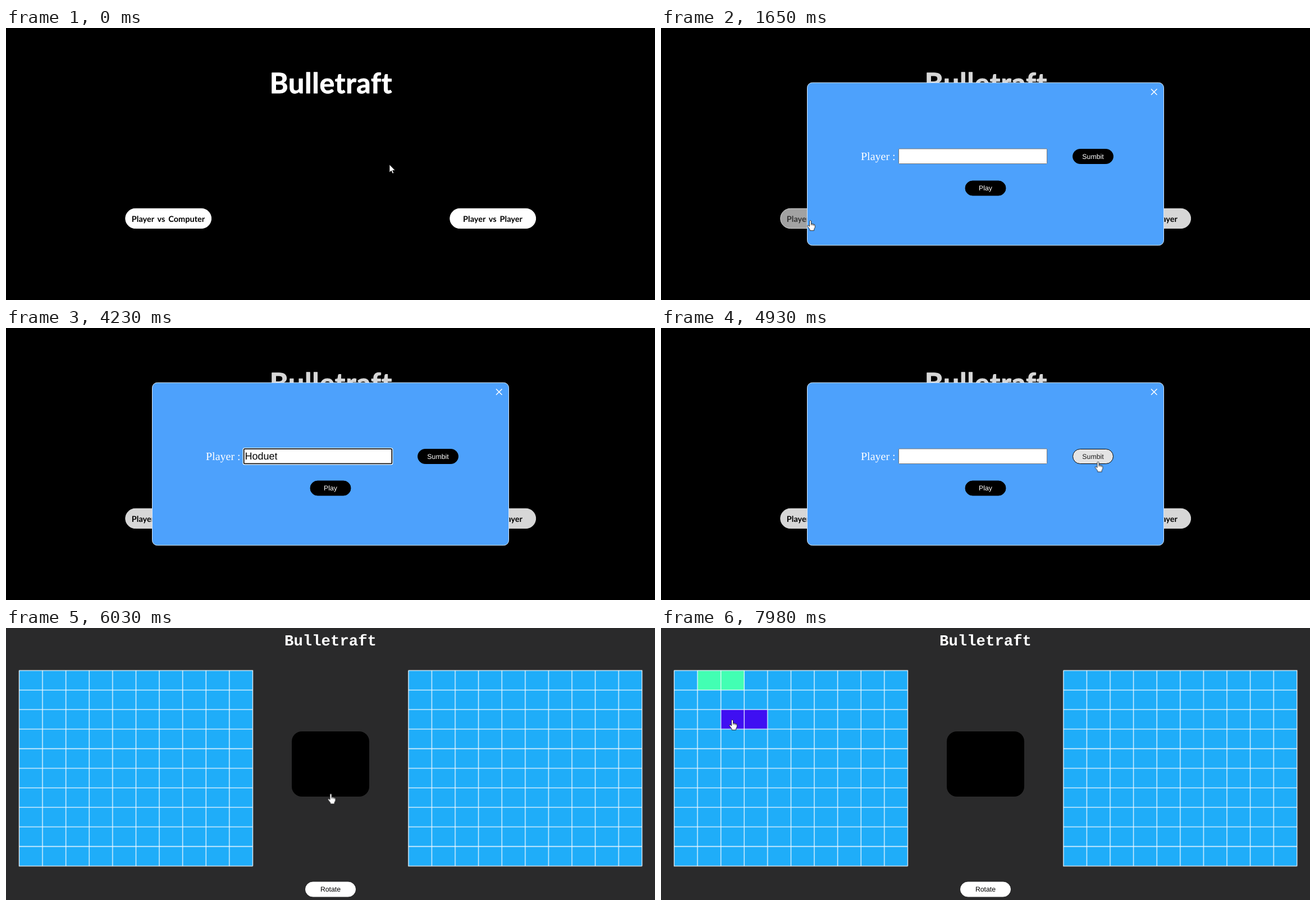
Write an HTML page that moves like this. It is 1156 px wide and 484 px high and loops after 8000 ms.

```html
<!DOCTYPE html>
<html lang="en">
<head>
<meta charset="utf-8">
<title>Bulletraft</title>
<style>
  html, body { margin: 0; height: 100%; overflow: hidden; background: #000; }
  svg { display: block; width: 100vw; height: 100vh; }
  text { text-anchor: middle; text-rendering: geometricPrecision; }

  .menu-font { font-family: Lato, sans-serif; font-weight: 700; stroke-linejoin: round; }
  .menu-title { font-size: 50px; fill: #fff; stroke: #fff; stroke-width: 1; letter-spacing: .8px; }
  .menu-label { font-size: 14.5px; word-spacing: 2.5px; }
  .ui { font: 12.3px "Liberation Sans", Arial, sans-serif; }
  .left { text-anchor: start; }
  .field-label { font: 20px "Liberation Serif", serif; fill: #fff; }
  .typed { font: 18px "Liberation Sans", Arial, sans-serif; }
  .game-title { font: bold 27.3px "Liberation Mono", monospace; fill: #fff; }

  .light { fill: #fff; color: #000; stroke: #fff; }
  .dark { fill: #000; color: #fff; stroke: #000; }
  .light text, .dark text { fill: currentColor; stroke: none; }

  /* One loop is 8 s, so 1% is 80 ms. */
  .hover { animation: 8s ease infinite; }
  .step { animation: 8s step-end infinite; }

  .versus { animation-name: versus; }
  @keyframes versus {
    0%, 7%, 25.4%, 100% { fill: #fff; color: #000; }
    15.6%, 16.6% { fill: #000; color: #fff; }
  }
  .send { animation-name: send; }
  @keyframes send {
    0%, 56.25%, 74.5%, 100% { fill: #000; color: #fff; }
    65%, 65.75% { fill: #fff; color: #000; }
  }
  .play { animation-name: play; }
  @keyframes play {
    0%, 69.25% { fill: #000; color: #fff; }
    78%, 100% { fill: #fff; color: #000; }
  }

  .dialog { animation-name: dialog; }
  @keyframes dialog { 0% { opacity: 0 } 16.62% { opacity: 1 } }
  .game { animation-name: game; }
  @keyframes game { 0% { opacity: 0 } 75.37% { opacity: 1 } }
  .focus { animation-name: focus; }
  @keyframes focus { 0% { opacity: 0 } 28.25% { opacity: 1 } 59.5% { opacity: 0 } }
  .caret { animation-name: caret; }
  @keyframes caret { 0% { opacity: 1 } 52.87% { opacity: 0 } }
  .typing { animation-name: typing; }
  @keyframes typing {
    0% { transform: translateX(0) }
    34.75% { transform: translateX(13px) }
    36.62% { transform: translateX(23px) }
    37.75% { transform: translateX(33px) }
    44.87% { transform: translateX(43px) }
    45.9% { transform: translateX(53px) }
    46.87%, 100% { transform: translateX(58px) }
  }

  /* Translations count in cells. */
  .ship { fill: #3f0ff2; animation-name: ship; }
  @keyframes ship {
    0% { opacity: 0; transform: translate(8px, 3px) }
    77.62% { opacity: 1; transform: translate(8px, 3px) }
    78.6% { opacity: 1; transform: translate(7px, 1px) }
    79.5% { opacity: 1; transform: translate(6px, 0) }
    83.62% { opacity: 1; transform: translate(3px, 0) }
    84.6% { opacity: 1; transform: translate(2px, 0) }
    85.5% { opacity: 1; transform: translate(1px, 0) }
    88.5% { opacity: 0; transform: translate(1px, 0) }
    96.75% { opacity: 1; transform: translate(2px, 1px) }
    97.75%, 100% { opacity: 1; transform: translate(2px, 2px) }
  }
  .placed { fill: #42ffb3; animation-name: placed; }
  @keyframes placed { 0% { opacity: 0 } 88.5% { opacity: 1 } }

  .pointer { animation-name: pointer; }
  @keyframes pointer {
    0% { transform: translate(683px, 243px) }
    1.62% { transform: translate(600px, 193px) }
    7.62% { transform: translate(287px, 355px) }
    8.6% { transform: translate(278px, 352px) }
    9.6% { transform: translate(270px, 346px) }
    10.6% { transform: translate(266px, 342px) }
    21.5% { transform: translate(290px, 330px) }
    22.5% { transform: translate(360px, 285px) }
    23.5% { transform: translate(430px, 246px) }
    55% { transform: translate(700px, 240px) }
    56% { transform: translate(750px, 238px) }
    57% { transform: translate(772px, 238px) }
    58% { transform: translate(778.5px, 237.5px) }
    65.75% { transform: translate(760px, 250px) }
    66.75% { transform: translate(700px, 266px) }
    67.75% { transform: translate(640px, 282px) }
    69.25% { transform: translate(600px, 290px) }
    70.2% { transform: translate(584px, 293px) }
    71.2% { transform: translate(578.5px, 294.5px) }
    77.62% { transform: translate(380px, 190px) }
    78.6% { transform: translate(330px, 130px) }
    79.5% { transform: translate(290px, 95px) }
    83.62% { transform: translate(137px, 91px) }
    84.6% { transform: translate(112px, 91px) }
    85.5% { transform: translate(94px, 91px) }
    94.75% { transform: translate(108px, 96px) }
    95.75% { transform: translate(113px, 108px) }
    96.75% { transform: translate(118px, 130px) }
    97.75% { transform: translate(123px, 148px) }
    98.75% { transform: translate(126px, 158px) }
    99.75%, 100% { transform: translate(127px, 163px) }
  }
  .arrow, .hand { fill: #fff; stroke: #111; stroke-width: .8; stroke-linejoin: round; }
  .arrow { animation-name: arrow; }
  @keyframes arrow {
    0% { opacity: 1 } 7.62% { opacity: 0 }
    21.5% { opacity: 1 } 24.5% { opacity: 0 }
    55% { opacity: 1 } 56% { opacity: 0 }
    65.75% { opacity: 1 } 69.25%, 100% { opacity: 0 }
  }
  .hand { animation-name: hand; }
  @keyframes hand {
    0% { opacity: 0 } 7.62% { opacity: 1 }
    21.5% { opacity: 0 } 56% { opacity: 1 }
    65.75% { opacity: 0 } 69.25%, 100% { opacity: 1 }
  }
</style>
</head>
<body>
<svg viewBox="0 0 1156 484" preserveAspectRatio="none">
  <defs>
    <rect id="sea" width="10" height="10" fill="#1fadf9"/>
    <path id="lines" fill="none" stroke="#f4faff" stroke-width="1.3" vector-effect="non-scaling-stroke"
      d="M0 0v10h1v-10h1v10h1v-10h1v10h1v-10h1v10h1v-10h1v10h1v-10h1v10
         M0 0h10v1h-10v1h10v1h-10v1h10v1h-10v1h10v1h-10v1h10v1h-10v1h10"/>
    <rect id="pill" x="-36" y="-13" width="72" height="26" rx="13"/>
  </defs>

  <!-- Menu -->
  <rect width="1156" height="484"/>
  <text class="menu-font menu-title" x="579" y="116">Bulletraft</text>
  <g class="menu-font menu-label">
    <g class="light hover versus">
      <rect x="212.8" y="321.3" width="152.8" height="35.3" rx="17.6"/>
      <text x="289" y="345">Player vs Computer</text>
    </g>
    <g class="light">
      <rect x="790.8" y="321.3" width="152.8" height="35.3" rx="17.6"/>
      <text x="867" y="345">Player vs Player</text>
    </g>
  </g>

  <!-- Name dialog -->
  <g class="step dialog">
    <rect width="1156" height="484" opacity=".155"/>
    <rect x="260.5" y="97.3" width="635" height="289.4" rx="9" fill="#4da1fc" stroke="#d6e9fe"/>
    <path d="M873 108.5l10.5 10.5m0-10.5l-10.5 10.5" stroke="#fff" stroke-width="1.5"/>
    <text class="field-label left" x="356" y="235">Player :</text>
    <rect x="423.5" y="215" width="264" height="26.5" rx="1" fill="#fff" stroke="#767676"/>
    <g class="step focus">
      <rect x="421.7" y="213.2" width="267.6" height="30.2" rx="3" fill="#fff"/>
      <rect x="423.7" y="215.2" width="263.6" height="26.2" rx="1.5" fill="#fff" stroke="#101010" stroke-width="1.8"/>
      <text class="typed left" x="425.5" y="234">Hoduet</text>
      <g class="step typing">
        <rect x="425.5" y="217" width="100" height="22" fill="#fff"/>
        <rect class="step caret" x="425" y="218" width="1.2" height="20"/>
      </g>
    </g>
    <g class="ui">
      <g class="dark hover send" transform="translate(769.5 228.5)">
        <use href="#pill"/><text y="4">Sumbit</text>
      </g>
      <g class="dark hover play" transform="translate(578 285)">
        <use href="#pill"/><text y="4">Play</text>
      </g>
    </g>
  </g>

  <!-- Boards -->
  <g class="step game">
    <rect width="1156" height="484" fill="#2a2a2b"/>
    <text class="game-title" x="578" y="31">Bulletraft</text>
    <g transform="translate(23.4 75.5) scale(41.6 34.8)">
      <use href="#sea"/>
      <rect class="step placed" x="1" width="2" height="1"/>
      <rect class="step ship" width="2" height="1"/>
      <use href="#lines"/>
    </g>
    <g transform="translate(716.8 75.5) scale(41.6 34.8)">
      <use href="#sea"/>
      <use href="#lines"/>
    </g>
    <rect x="509" y="184" width="138" height="116" rx="18"/>
    <g class="ui light">
      <rect x="533.5" y="452" width="89" height="26" rx="13"/>
      <text x="578" y="469">Rotate</text>
    </g>
  </g>

  <g class="step pointer">
    <path class="step arrow" d="M0 0V14L3.3 11L5.5 16L7.7 15L5.6 10.3H10Z"/>
    <g class="step hand">
      <path d="M-1.5 1.5Q0-.7 1.5 1.5V6L6.8 7.5Q8.3 8 8.3 9.5V13L6.6 16V18.5H-.8V16.5L-5 11Q-5.7 9-3.8 9L-1.5 11Z"/>
      <path d="M1.5 6V9M3.9 7V9.5M6.2 7.5V10" fill="none"/>
    </g>
  </g>
</svg>
</body>
</html>
```
